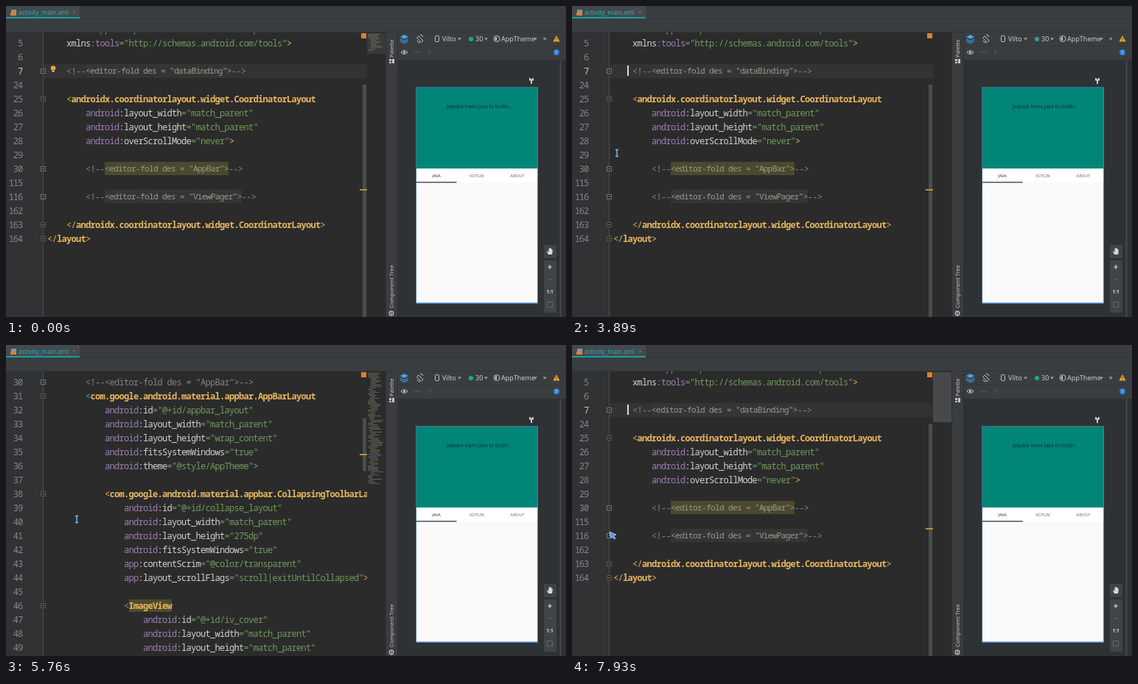
An HTML page for the animation above (8000 ms loop, 760x423 px).

```html
<!DOCTYPE html>
<html lang="en">
<head>
<meta charset="utf-8">
<title>Editor folding</title>
<style>
@property --s { syntax: '<length>'; inherits: true; initial-value: 0px; }
html, body { margin: 0; width: 100%; height: 100%; overflow: hidden; background: #2b2b2b; }
#stage { position: relative; width: 760px; height: 423px; overflow: hidden; }
#stage > svg, .mouse svg { position: absolute; left: 0; top: 0; overflow: visible; }
#ui { font-family: "Noto Sans", "Open Sans", sans-serif; }

.editor { position: absolute; left: 0; top: 36px; width: 515px; height: 387px; overflow: hidden;
  background: #2b2b2b; animation: scroll 8s step-end infinite; }
.gutter { position: absolute; left: 0; top: 0; width: 50px; height: 100%; background: #303234; border-right: 1px solid #4a4c4e; }
.scene { position: absolute; inset: 0; animation: 8s step-end infinite; }
#fold { animation-name: fold; }
#data { animation-name: data; }
#bar { animation-name: bar; }
.rows { position: absolute; left: 0; top: 0; width: 489.5px; height: 100%; overflow: hidden; }
.scroll { position: absolute; left: 0; top: 4.5px; width: 490px; transform: translateY(calc(var(--s) * -1)); }
.row { position: absolute; left: 0; width: 490px; height: 19px; line-height: 19px; white-space: pre;
  font: 500 12px/19px "Noto Sans Mono", "DejaVu Sans Mono", monospace; letter-spacing: -.7px; color: #d2d2d2; }
.row.now::before { content: ""; position: absolute; left: 51px; right: 0; top: 0; bottom: 0; background: #333; }
.num { position: absolute; right: 468px; color: #85888a; letter-spacing: -1.1px; }
.now .num { color: #c4c4c4; }
.code { position: absolute; left: 56px; }
.icon { position: absolute; left: 47px; top: 6px; width: 5px; height: 5px; border: 1px solid #55585a; background: #2b2b2b; }
.icon::after { content: ""; position: absolute; left: 1px; top: 2px; width: 3px; height: 1px; background: #777; }
.icon.note { border-color: #74787a; }
.icon.end { border-color: #5b8a5e; }
.tag { color: #e8b65c; font-weight: 600; }
.ns { color: #9c7fb5; }
.val { color: #719a5b; }
.note { color: #838383; }
.box { display: inline-block; height: 18px; line-height: 18px; font-size: 11.2px; letter-spacing: -.72px; background: #353535; color: #9b9b8e; vertical-align: top; }
.box.warm { background: #4b482f; }
.mark { background: #4f4a2c; }
.u { text-decoration: underline; text-decoration-color: #719a5b; }

.thumb, .tick, .map { position: absolute; }
.thumb { left: 484px; width: 5px; background: #4a4c4d; }
#bar .thumb { transform: translateY(calc(var(--s) * .26)); }
.tick { left: 480px; width: 10px; height: 2px; background: #b8932c; }
.flag { position: absolute; left: 482px; top: 1px; width: 7px; height: 7px; background: #d9822b; }
.map { left: 490px; top: 1px; width: 25px; }
.map i { position: absolute; height: 1px; }
#fold .map { animation: first 8s step-end infinite; }
.pane { position: absolute; left: 490px; top: 1px; width: 25px; height: 68px; background: #47494a; animation: last 8s step-end infinite; }
.caret { position: absolute; left: 75px; top: 45px; width: 1.5px; height: 14px; background: #ddd;
  transform: translateY(calc(var(--s) * -1)); animation: caret 8s step-end infinite; }
.bulb { position: absolute; left: 60px; top: 45px; animation: first 8s step-end infinite; }

.mouse { position: absolute; left: 0; top: 0; animation: move 8s infinite cubic-bezier(.25,.6,.4,1); }
.mouse g { animation: 8s step-end infinite; }
#disc { animation-name: disc; }
#hand { animation-name: hand; }
#beam { animation-name: beam; }
#arrow { animation-name: arrow; }

@keyframes scroll {
  0%, 89.5% { --s: 0px; } 67% { --s: 19px; } 68% { --s: 50px; } 69.125% { --s: 76px; }
  70.25% { --s: 114px; } 71.125% { --s: 145px; } 72% { --s: 171px; } 73.125% { --s: 160px; }
  74.125% { --s: 133px; } 75% { --s: 112px; } 75.875% { --s: 80px; } 76.875% { --s: 57px; }
}
@keyframes fold { 0%, 39.875%, 89.5% { visibility: visible; } 18.75%, 57.375% { visibility: hidden; } }
@keyframes data { 0%, 39.875% { visibility: hidden; } 18.75% { visibility: visible; } }
@keyframes bar { 0%, 89.5% { visibility: hidden; } 57.375% { visibility: visible; } }
@keyframes first { 0% { opacity: 1; } 18.75%, 100% { opacity: 0; } }
@keyframes last { 0% { opacity: 0; } 89.5%, 100% { opacity: 1; } }
@keyframes caret { 0% { opacity: 0; } 17.75%, 100% { opacity: 1; } }
@keyframes move {
  0%, 5.125% { transform: translate(700px, 440px); }
  15%, 23.375% { transform: translate(50px, 88px); }
  29.375%, 33.25% { transform: translate(58px, 386px); }
  37.125%, 43.625% { transform: translate(50px, 88px); }
  48.625%, 49.625% { transform: translate(61px, 200px); }
  54.375%, 67% { transform: translate(50px, 223px); }
  68.75%, 77.875% { transform: translate(96px, 237px); }
  82.625%, 83.625% { transform: translate(51px, 173px); }
  87.5%, 92.375% { transform: translate(50px, 165px); }
  99.125%, 100% { transform: translate(51px, 254px); }
}
@keyframes disc {
  0%, 19.5%, 40.75%, 58.25%, 90.625% { opacity: 0; }
  17.75%, 39.875%, 57.375%, 88.375% { opacity: 1; }
}
@keyframes hand {
  0%, 23.375%, 43.625%, 67%, 92.375% { opacity: 0; }
  15.625%, 37.125%, 54.375%, 87.5% { opacity: 1; }
}
@keyframes beam { 0%, 51.25%, 78.75% { opacity: 0; } 46.25%, 67.875% { opacity: 1; } }
@keyframes arrow {
  0%, 23.375%, 43.625%, 51.25%, 67%, 78.75%, 92.375% { opacity: 1; }
  15.625%, 37.125%, 46.25%, 54.375%, 67.875%, 87.5% { opacity: 0; }
}
</style>
</head>
<body>
<div id="stage">
  <svg id="ui" width="760" height="423" fill="none">
    <rect width="760" height="423" fill="#3a3d3f"/>
    <rect width="100" height="15" fill="#444a4d"/>
    <rect y="15" width="100" height="2" fill="#1b9da4"/>
    <path d="M100 17.5H760M0 35.500H760" stroke="#323537"/>
    <rect x="7" y="5" width="7" height="8" fill="#8b9399"/>
    <rect x="6" y="9" width="8" height="4" fill="#d9822b"/>
    <text x="17" y="12" font-size="8.400" fill="#20b5bd">activity_main.xml</text>
    <path d="M91 7l3 3m0-3l-3 3" stroke="#7b8285" stroke-width=".8"/>

    <path d="M515.5 36V423M531.5 36V423" stroke="#2e3133"/>
    <g fill="#c3c5c6" font-size="7.500">
      <text transform="translate(526 70) rotate(-90)">Palette</text>
      <text transform="translate(526 411) rotate(-90)">Component Tree</text>
      <path d="M520 72h3v3h-3zM524 72h3v3h-3zM520 76h3v2h-3zM524 75h3v3h-3z"/>
    </g>
    <circle cx="523" cy="418" r="2.800" stroke="#c3c5c6" stroke-width="1.200"/>
    <path d="M523 415v6" stroke="#c3c5c6"/>

    <path d="M532 54.500H760" stroke="#343739"/>
    <rect x="532" y="73" width="228" height="350" fill="#2f3234"/>
    <path d="M535 45l5.500 3 5.500-3M535 47.500l5.500 3 5.500-3" stroke="#3a90d8" stroke-width="1.300"/>
    <path d="M540.500 39l5.500 3-5.500 3-5.500-3z" fill="#4aa0e8"/>
    <path d="M560 41l6 6-2.500 2.500-6-6zM558 47q1 3 4 3M566 42q-1-3-4-3" stroke="#c3c5c6"/>
    <rect x="582.500" y="40.500" width="5" height="8" rx="1" stroke="#c3c5c6"/>
    <circle cx="631" cy="45" r="3" fill="#23a69a"/>
    <circle cx="666" cy="44.500" r="4" stroke="#c3c5c6"/>
    <path d="M666 42a2.500 2.500 0 0 0 0 5z" fill="#c3c5c6"/>
    <g font-size="9" fill="#c9cbcc">
      <text x="592" y="48">Vilto</text>
      <text x="637" y="48">30</text>
      <text x="672" y="48">AppTheme</text>
      <text x="729" y="47">»</text>
    </g>
    <path d="M613 43.500h5l-2.500 3zM649 43.500h5l-2.500 3zM716 43.500h5l-2.500 3z" fill="#a6a9aa"/>
    <path d="M747 40l4.500 8.500h-9z" fill="#f0a732"/>
    <path d="M747 43v3m0 1v1" stroke="#4b3a20"/>
    <path d="M536 63q4.500-5 9 0q-4.500 5-9 0z" stroke="#c3c5c6"/>
    <circle cx="540.500" cy="63" r="1.600" fill="#c3c5c6"/>
    <path d="M554 63h9M574 59v8m2-4l3-3" stroke="#565a5c"/>
    <circle cx="747" cy="63" r="4" fill="#2f7fd6"/>
    <text x="745.300" y="65.500" font-size="7" fill="#d9e8f8">?</text>
    <path d="M752.500 74V423" stroke="#46494b" stroke-width="2"/>

    <path d="M711 98v2.500h4V98M713 100v6" stroke="#d5d7d8" stroke-width="1.800"/>
    <rect x="557" y="111" width="164.500" height="293" fill="#fafafa"/>
    <rect x="557" y="111" width="164.500" height="110" fill="#008577"/>
    <rect x="557" y="221" width="164.500" height="19" fill="#fff"/>
    <rect x="557" y="239" width="54.500" height="1.500" fill="#4d5254"/>
    <rect x="556.500" y="110.500" width="165" height="293.500" stroke="#4d84b8" stroke-width=".7"/>
    <path d="M557 404.300h165" stroke="#3c7fd0" stroke-width="1.300"/>
    <g text-anchor="middle" font-size="5.600" fill="#6b6b6b">
      <text x="641" y="138.500" font-size="6.800" fill="#07352f">Jetpack trans Java to Kotlin.</text>
      <text x="584" y="233" fill="#333">JAVA</text>
      <text x="639" y="233">KOTLIN</text>
      <text x="694" y="233">ABOUT</text>
    </g>
    <rect x="730" y="325" width="17" height="18" rx="1" fill="#414446"/>
    <rect x="730" y="346" width="17" height="71" rx="1" fill="#414446"/>
    <path d="M734 334l2 4h5l1-6-1.500-.5V330h-1.300v-1h-1.400v1h-1.300v5l-1.300-1.500z" fill="#d5d7d8"/>
    <path d="M735 355h6m-3-3v6" stroke="#d5d7d8" stroke-width="1.200"/>
    <path d="M735 372h6M734.500 402.500h7v7h-7z" stroke="#62666a"/>
    <text x="733.500" y="391" font-size="6.500" font-weight="600" fill="#d5d7d8">1:1</text>
  </svg>

  <div class="editor">
    <div class="gutter"></div>
    <div class="scene" id="fold"></div>
    <div class="scene" id="data"></div>
    <div class="scene" id="bar"></div>
    <div class="pane"></div>
    <div class="flag"></div>
    <div class="caret"></div>
    <svg class="bulb" width="8" height="10"><circle cx="4" cy="3.500" r="3.300" fill="#f0a732"/><path d="M2.500 7h3v2h-3z" fill="#b9bcbd"/></svg>
  </div>

  <div class="mouse"><svg width="1" height="1">
    <g id="disc"><circle r="6" fill="#b9b916"/></g>
    <g id="hand"><path d="M-1 0q1-1.500 2 0v3.500l4 1q1 .4.700 2L5 10H0L-2.500 6l1.500-.5z" fill="#fff" stroke="#333" stroke-width=".5"/></g>
    <g id="beam"><path d="M-2-4.500h4M0-4.500v9M-2 4.500h4" fill="none" stroke="#7cc0f5" stroke-width="1.400"/></g>
    <g id="arrow"><path d="M0 0l9 4-3.500 1.300L8 9 6.300 10 4 6.500 1.800 9z" fill="#3f9bf0" stroke="#d8ecff" stroke-width=".7"/></g>
  </svg></div>
</div>

<script>
const head = `4     xmlns:app="http://schemas.android.com/apk/res-auto"
5     xmlns:tools="http://schemas.android.com/tools">
6
`;
const folded = '7     <!--[<editor-fold des = "dataBinding">]-->\n';
const root = `24
25     <androidx.coordinatorlayout.widget.CoordinatorLayout
26         android:layout_width="match_parent"
27         android:layout_height="match_parent"
28         android:overScrollMode="never">
29
`;

const scenes = {
  fold: { thumb: [71, 316], tick: 213, map: 12, text: head + folded + root.replace('29\n', '') + `29
30         <!--[<editor-fold des = "AppBar">]-->
115
116         <!--[<editor-fold des = "ViewPager">]-->
162
163     </androidx.coordinatorlayout.widget.CoordinatorLayout>
164 </layout>` },
  data: { thumb: [46, 195], tick: 284, map: 28, text: head + `7     <!-- <editor-fold des = "dataBinding"> -->
8     <data>
9
10         <variable
11             name="vm"
12             type="com.lorvenk.puremusic.ui.state.MainActivityViewModel" />
13
14         <variable
15             name="adapterJava"
16             type="androidx.recyclerview.widget.ListAdapter" />
17
18         <variable
19             name="adapterKotlin"
20             type="androidx.recyclerview.widget.ListAdapter" />
21
22     </data>
23     <!--</editor-fold>-->
24` },
  bar: { thumb: [19, 72], tick: 112, map: 76, text: head + folded + root + `30         <!--<editor-fold des = "AppBar">-->
31         <com.google.android.material.appbar.AppBarLayout
32             android:id="@+id/appbar_layout"
33             android:layout_width="match_parent"
34             android:layout_height="wrap_content"
35             android:fitsSystemWindows="true"
36             android:theme="@style/AppTheme">
37
38             <com.google.android.material.appbar.CollapsingToolbarLayout
39                 android:id="@+id/collapse_layout"
40                 android:layout_width="match_parent"
41                 android:layout_height="275dp"
42                 android:fitsSystemWindows="true"
43                 app:contentScrim="@color/transparent"
44                 app:layout_scrollFlags="scroll|exitUntilCollapsed">
45
46                 <ImageView
47                     android:id="@+id/iv_cover"
48                     android:layout_width="match_parent"
49                     android:layout_height="match_parent"
50                     android:fitsSystemWindows="true"
51                     android:scaleType="centerCrop" />` }
};

const esc = s => s.replace(/&/g, '&amp;').replace(/</g, '&lt;');
const span = (cls, s) => `<span class="${cls}">${esc(s)}</span>`;
const bracket = (depth, s) =>
  `<span style="color:${depth % 8 ? '#dcb85a' : depth ? '#56a6e8' : '#e8b65c'}">${esc(s)}</span>`;

function paint(line) {
  const code = line.trimStart(), depth = line.length - code.length, pad = ' '.repeat(depth);
  let m;
  if (code.startsWith('<!--')) {
    m = code.match(/^(<!--)\[(.*)\](-->)$/);
    if (!m) return pad + span('note', code);
    return pad + span('note', m[1]) + span(/AppBar/.test(code) ? 'box warm' : 'box', m[2]) + span('note', m[3]);
  }
  if ((m = code.match(/^(<\/?)([\w.]+)(>?)$/)))
    return pad + bracket(depth, m[1]) + span(m[2] === 'ImageView' ? 'tag mark' : 'tag', m[2]) + bracket(depth, m[3]);
  if ((m = code.match(/^(\w+)(:\w+)?=("[^"]*")(.*)$/))) {
    const [, a, b = '', value, end] = m, xmlns = a === 'xmlns';
    const name = span(b && !xmlns ? 'ns' : '', a) + span(xmlns ? 'ns' : '', b);
    const text = span('val', '=' + value).replace('lorvenk', '<span class="u">lorvenk</span>');
    return pad + name + text + bracket(depth - 4, end);
  }
  return '';
}

function row(src, i) {
  const [, num, line] = src.match(/^(\d+) ?(.*)$/);
  const code = line.trimStart();
  const kind = code.startsWith('<!--</') ? 'end' : code.startsWith('<!--') ? 'note' : '';
  const icon = code[0] === '<' ? `<i class="icon ${kind}"></i>` : '';
  return `<div class="row${num === '7' ? ' now' : ''}" style="top:${(i - 1) * 19}px">` +
    `<span class="num">${num}</span>${icon}<span class="code">${paint(line)}</span></div>`;
}

// Seeded dashes stand for the overview of the file.
function overview(n) {
  let seed = 7;
  const rnd = () => (seed = seed * 16807 % 2147483647) / 2147483647;
  const dash = (_, i) => {
    const x = 1 + Math.floor(rnd() * 3) * 2, w = 5 + rnd() * 13;
    const color = ['#5d6b50', '#6e6650', '#5f5a68'][Math.floor(rnd() * 3)];
    return `<i style="left:${x}px;top:${1 + i * 2}px;width:${w}px;background:${color}"></i>`;
  };
  const shade = n < 40 ? '#37393a' : 'none';
  return `<div class="map" style="height:${n * 2 + 4}px;background:${shade}">` +
    Array.from({ length: n }, dash).join('') + '</div>';
}

for (const [id, { thumb, tick, map, text }] of Object.entries(scenes))
  document.getElementById(id).innerHTML =
    `<div class="rows"><div class="scroll">${text.split('\n').map(row).join('')}</div></div>` +
    `<div class="thumb" style="top:${thumb[0]}px;height:${thumb[1]}px"></div>` +
    `<div class="tick" style="top:${tick}px"></div>` + overview(map);
</script>
</body>
</html>
```
